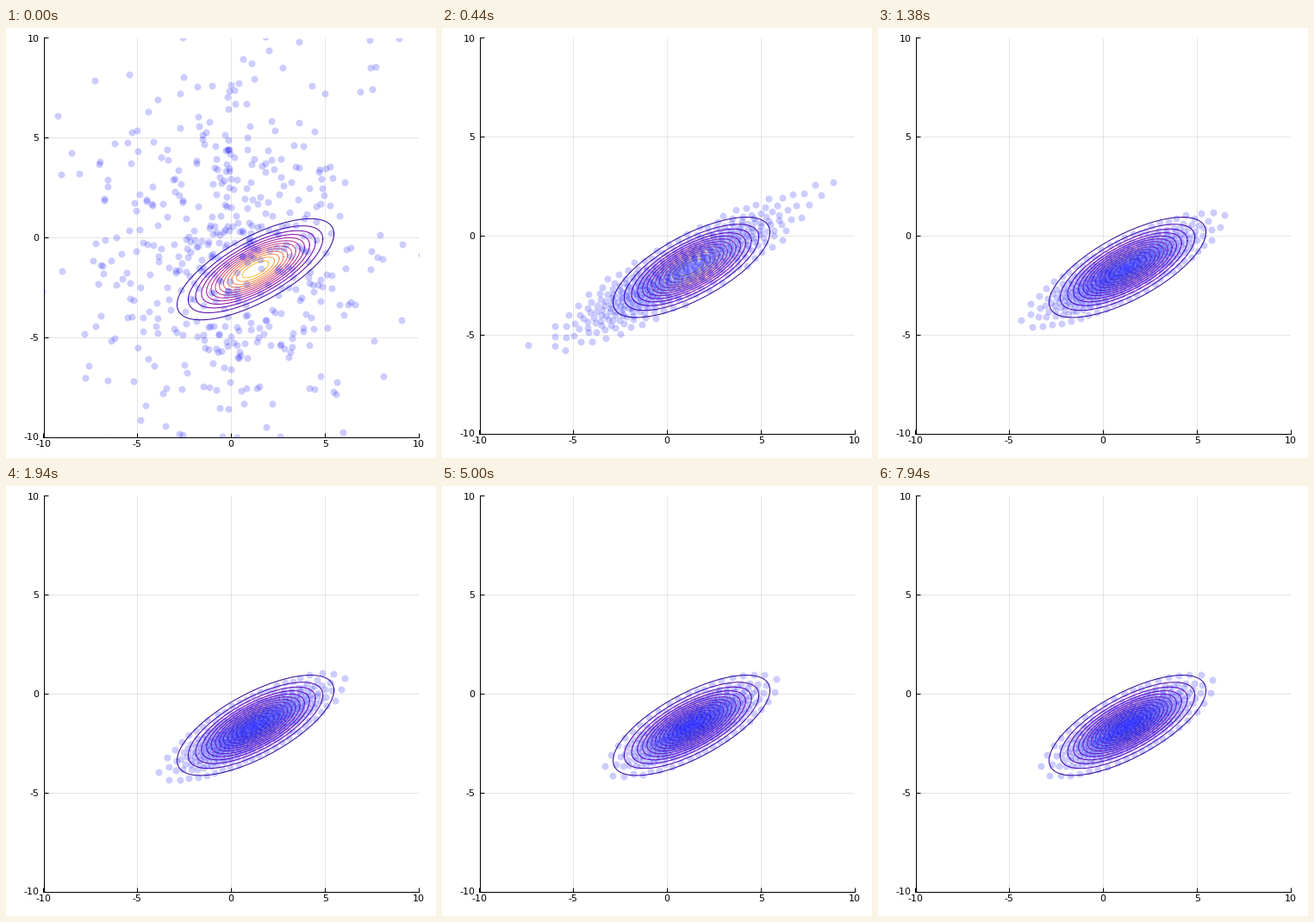
Write a matplotlib script that moves like this. It is 499x499 px and loops after 8 s.

```python
import numpy as np
import matplotlib.pyplot as plt
from matplotlib.animation import FuncAnimation

SIZE, DPI = 499, 100
FRAMES, INTERVAL = 128, 62.5
PX = 72 / DPI                      # one pixel in points
LEFT, RIGHT, TOP = 43.5, 479, 11.5
FIRST_BOTTOM, BOTTOM = 474.5, 470.5

COUNT = 500
SPREAD = (4, 5)                    # deviation of the starting cloud
STEP, SUBSTEPS = 0.18, 4           # flow time per frame
WIDTH = 0.09                       # kernel variance

MEAN = np.array([1.30, -1.60])
SX, SY, RHO = 1.78, 1.08, 0.70
COV = np.array([[SX * SX, RHO * SX * SY], [RHO * SX * SY, SY * SY]])
PRECISION = np.linalg.inv(COV)


def velocity(p):
    """Pull towards the Gaussian minus the score of the particles' density."""
    sq = (p ** 2).sum(1)
    dist = np.maximum(sq[:, None] + sq - 2 * p @ p.T, 0)
    k = np.exp(-dist / (2 * WIDTH))
    push = (p - k @ p / k.sum(1)[:, None]) / WIDTH
    return push - (p - MEAN) @ PRECISION


def simulate():
    p = np.random.default_rng(7).normal(0, SPREAD, (COUNT, 2))
    path = [p]
    for _ in range(FRAMES - 1):
        for _ in range(SUBSTEPS):
            p = p + STEP / SUBSTEPS * velocity(p)
        path.append(p)
    return path


def place(bottom):
    ax.set_position([LEFT / SIZE, 1 - bottom / SIZE,
                     (RIGHT - LEFT) / SIZE, (bottom - TOP) / SIZE])


def draw_contours(levels=13):
    turn = np.linspace(0, 2 * np.pi, 200)
    ring = np.linalg.cholesky(COV) @ [np.cos(turn), np.sin(turn)]
    scale = SX * np.sqrt(2 * np.log(levels + 1)) / 4.18
    for i in range(1, levels + 1):
        share = i / (levels + 1)
        x, y = MEAN[:, None] + np.sqrt(-2 * np.log(share)) / scale * ring
        ax.plot(x, y, color=plt.cm.plasma(share * 0.92), lw=PX, zorder=2)


def update(i):
    place(BOTTOM if i else FIRST_BOTTOM)
    dots.set_offsets(path[i])
    return dots,


path = simulate()
plt.rcParams["font.family"] = "DejaVu Sans"
plt.rcParams["axes.unicode_minus"] = False
fig = plt.figure(figsize=(SIZE / DPI, SIZE / DPI), dpi=DPI, facecolor="white")
ax = fig.add_axes([0, 0, 1, 1])
ticks = range(-10, 11, 5)
ax.set(xlim=(-10, 10), ylim=(-10, 10), xticks=ticks, yticks=ticks)
ax.set_axisbelow(True)
ax.grid(color="black", alpha=0.1, lw=PX)
ax.tick_params(direction="in", length=5 * PX, width=PX, pad=5 * PX,
               labelsize=11 * PX)
ax.tick_params(axis="x", pad=4 * PX)
ax.spines[["top", "right"]].set_visible(False)
ax.spines[["left", "bottom"]].set_linewidth(PX)
draw_contours()
dots = ax.scatter(*path[0].T, s=(8 * PX) ** 2, color="blue", alpha=0.2,
                  linewidths=0, zorder=3)

anim = FuncAnimation(fig, update, frames=FRAMES, interval=INTERVAL,
                     repeat=True, repeat_delay=0, blit=False)
plt.show()
```
